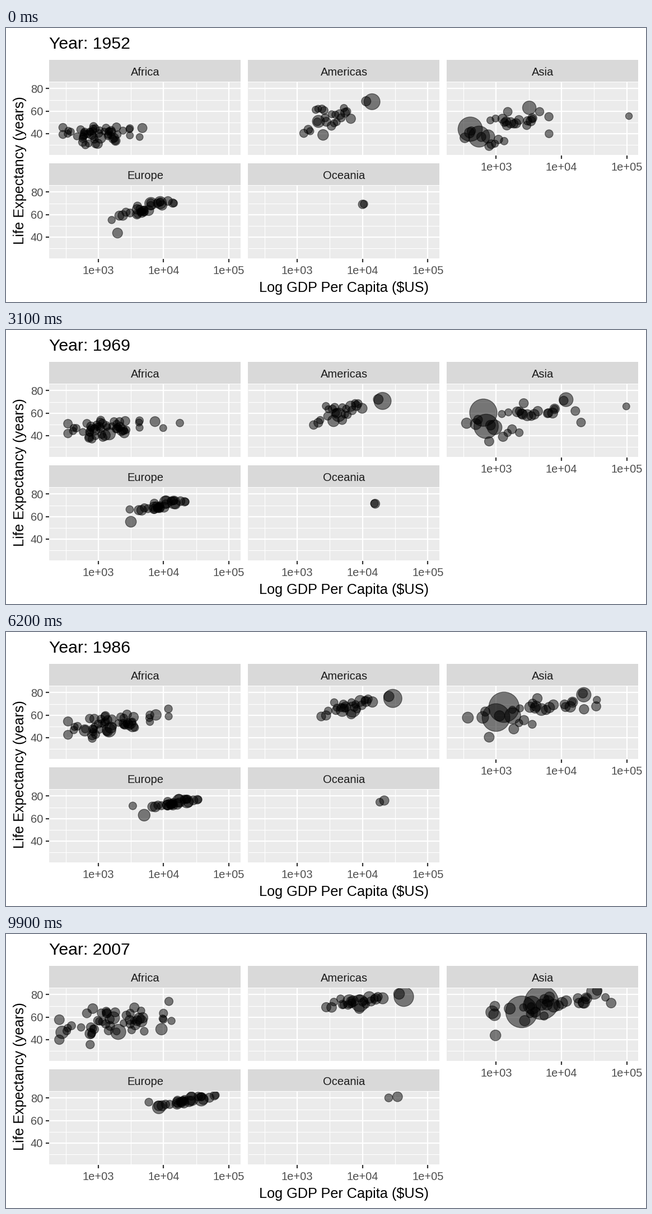
Recreate the animation shown at these times as a matplotlib script. Size 1143x490 px, loop 10000 ms.

```python
import numpy as np
import matplotlib.pyplot as plt
from matplotlib.animation import FuncAnimation
from matplotlib.patches import Rectangle

W, H, DPI = 1143, 490, 100
PT = 72 / DPI                      # points per pixel
FRAMES, INTERVAL = 100, 100
FIRST, LAST = 1952, 2007
PANEL_W, PANEL_H, STRIP_H = 342.6, 130.6, 39.6
X_MIN, X_SCALE = 2.2487, 116.53    # log10 income at left edge, px per decade
Y_MAX, Y_SCALE = 85.55, 2.0115     # life expectancy at top edge, px per year

plt.rcParams["font.family"] = "Liberation Sans"
rng = np.random.default_rng(12)

# Crowd shape at the start, middle and end of the loop:
# mean and spread of log10 income, mean and spread of life, their correlation
AFRICA = [(2.97, .27, 39.5, 4.8, .30),
          (3.15, .30, 50.5, 6.0, .55),
          (3.20, .42, 55.5, 9.5, .40)]
AMERICAS = [(3.48, .20, 53.3, 8.5, .60),
            (3.74, .21, 65.5, 5.8, .75),
            (3.90, .24, 73.5, 3.4, .55)]
ASIA = [(3.20, .32, 47.5, 8.5, .60),
        (3.60, .45, 63.0, 7.5, .70),
        (3.85, .48, 71.0, 6.0, .75)]
EUROPE = [(3.74, .22, 65.6, 4.2, .85),
          (4.12, .17, 72.7, 2.0, .75),
          (4.36, .23, 77.8, 2.6, .85)]

# Bubbles that stand out: population in millions at the start and the end,
# then (income, life) at evenly spaced times
AFRICA_BIG = [
    (1, 6, [(2388, 42.7), (20200, 51.8), (11000, 67.5), (12057, 74)]),
    (.4, 1.5, [(4293, 37), (10400, 47.4), (12200, 60.5), (13206, 56.7)]),
    (14, 44, [(4725, 45), (7600, 53), (7620, 61.2), (9270, 49.3)]),
    (33, 135, [(1077, 36.3), (1500, 42), (1450, 47.2), (2014, 46.9)]),
    (14, 65, [(781, 39.1), (890, 45.3), (590, 46.6), (278, 46.5)])]
AMERICAS_BIG = [
    (158, 301, [(13990, 68.4), (20800, 71), (30500, 75.4), (42952, 78.2)]),
    (15, 33, [(11367, 68.8), (17900, 72.5), (26550, 77.2), (36319, 80.7)]),
    (57, 190, [(2109, 50.9), (4500, 59), (7500, 65.8), (9066, 72.4)])]
ASIA_BIG = [
    (556, 1319, [(400, 44), (655, 61.5), (1450, 67.8), (4959, 73)]),
    (372, 1110, [(547, 37.4), (713, 49), (1040, 59.1), (2452, 64.7)]),
    (87, 127, [(3217, 63), (12800, 72.6), (23700, 78.9), (31656, 82.6)]),
    (82, 224, [(750, 37.5), (960, 48), (1950, 61), (3541, 70.7)]),
    (20, 48, [(331, 36.3), (354, 52), (370, 58.6), (944, 62.1)]),
    (8, 32, [(779, 28.8), (780, 35.3), (780, 41.1), (975, 43.8)]),
    (4, 28, [(6460, 39.9), (21500, 52.5), (22300, 67), (21655, 72.8)]),
    (.2, 2.5, [(108382, 55.6), (98000, 66.7), (30300, 74.5), (47307, 77.6)])]
EUROPE_BIG = [
    (22, 71, [(1969, 43.6), (3250, 56.2), (5350, 64), (8458, 71.8)]),
    (1.3, 3.6, [(1601, 55.2), (3150, 67.1), (3400, 71.9), (5937, 76.4)])]
OCEANIA_BIG = [
    (8.7, 20, [(10040, 69.1), (16100, 71.6), (22400, 76.7), (34435, 81.2)]),
    (2, 4.1, [(10557, 69.4), (15600, 71.8), (18800, 75), (25185, 80.2)])]


def radius(pop):
    return 5.75 + 24.64 * np.sqrt(pop / 1318.7)


def between(stops, t):
    """Value at t in 0..1 along evenly spaced stops."""
    stops = np.asarray(stops, float)
    pos = t * (len(stops) - 1)
    i = min(int(pos), len(stops) - 2)
    return stops[i] + (stops[i + 1] - stops[i]) * (pos - i)


class Crowd:
    """Random bubbles whose cloud follows the given shapes."""

    def __init__(self, count, shapes, pop, growth):
        self.shapes = shapes
        z = rng.normal(size=(4, count))
        z = (z - z.mean(1, keepdims=True)) / z.std(1, keepdims=True)
        self.u, self.v, self.w, size = np.clip(z, -1.9, 1.9)
        end = pop * np.exp(1.15 * size)
        self.radii = radius(end / growth), radius(end)

    def at(self, t):
        x, dx, y, dy, rho = between(self.shapes, t)
        drift = self.v * np.cos(t) + self.w * np.sin(t)
        life = y + dy * (rho * self.u + np.sqrt(1 - rho ** 2) * drift)
        return x + dx * self.u, life, between(self.radii, t)


class Landmark:
    """One bubble on its own path."""

    def __init__(self, start_pop, end_pop, path):
        self.path = [(np.log10(income), life) for income, life in path]
        self.radii = radius(start_pop), radius(end_pop)

    def at(self, t):
        return *between(self.path, t), between(self.radii, t)


fig = plt.figure(figsize=(W / DPI, H / DPI), dpi=DPI, facecolor="white")
ax = fig.add_axes([0, 0, 1, 1])
ax.set_xlim(0, W)
ax.set_ylim(H, 0)
ax.axis("off")


def text(x, y, s, size, color="black", ha="center", **kw):
    return ax.text(x, y, s, fontsize=size * PT, color=color, ha=ha,
                   va="baseline", **kw)


def line(xs, ys, color, width):
    ax.plot(xs, ys, color=color, lw=width * PT, solid_capstyle="butt",
            zorder=1)


def box(x, y, w, h, color):
    return ax.add_patch(Rectangle((int(x), int(y)), int(w), int(h),
                                  fc=color, lw=0))


class Panel:
    def __init__(self, name, col, row, landmarks, crowd=None):
        self.left = 77.4 + 355.25 * col
        self.top = 97.3 + 185 * row
        self.groups = [Landmark(*mark) for mark in landmarks]
        if crowd:
            self.groups.append(crowd)
        self.draw_back(name)
        self.dots = ax.scatter([], [], facecolor=(0, 0, 0, .5),
                               edgecolor=(0, 0, 0, .5), linewidth=1.3 * PT,
                               zorder=3)
        self.dots.set_clip_path(self.area)

    def x(self, log_income):
        return self.left + (log_income - X_MIN) * X_SCALE

    def y(self, life):
        return self.top + (Y_MAX - life) * Y_SCALE

    def draw_back(self, name):
        left, top = self.left, self.top
        right, bottom = left + int(PANEL_W), top + int(PANEL_H)
        self.area = box(left, top, PANEL_W, PANEL_H, "#EBEBEB")
        box(left, top - STRIP_H, PANEL_W, STRIP_H, "#D9D9D9")
        text((left + right) / 2, top - 12.6, name, 20.2, "#1A1A1A")
        for shift, width in ((.5, 1.1), (0, 2.2)):
            for k in range(3):
                y = self.y(40 + 20 * (k - shift))
                x = self.x(3 + k - shift)
                line([left, right], [y, y], "white", width)
                line([x, x], [top, bottom], "white", width)

    def x_axis(self):
        bottom = self.top + PANEL_H
        for v in (3, 4, 5):
            line([self.x(v)] * 2, [bottom, bottom + 6.3], "#333333", 2.2)
            text(self.x(v), bottom + 26.8, f"1e+0{v}", 20.2, "#4D4D4D")

    def y_axis(self):
        for v in (40, 60, 80):
            line([self.left - 6.3, self.left], [self.y(v)] * 2, "#333333", 2.2)
            text(self.left - 11.2, self.y(v) + 7.5, str(v), 20.2, "#4D4D4D",
                 ha="right")

    def update(self, t):
        parts = [np.atleast_2d(np.transpose(g.at(t))) for g in self.groups]
        log_income, life, r = np.vstack(parts).T
        self.dots.set_offsets(np.c_[self.x(log_income), self.y(life)])
        self.dots.set_sizes((2 * r * PT) ** 2)


africa = Panel("Africa", 0, 0, AFRICA_BIG, Crowd(47, AFRICA, 6.5, 3.6))
americas = Panel("Americas", 1, 0, AMERICAS_BIG, Crowd(22, AMERICAS, 9, 2.5))
asia = Panel("Asia", 2, 0, ASIA_BIG, Crowd(25, ASIA, 17, 2.7))
europe = Panel("Europe", 0, 1, EUROPE_BIG, Crowd(28, EUROPE, 9, 1.3))
oceania = Panel("Oceania", 1, 1, OCEANIA_BIG)
panels = [africa, americas, asia, europe, oceania]

for panel in (asia, europe, oceania):
    panel.x_axis()
for panel in (africa, europe):
    panel.y_axis()

title = text(77.4, 37, "", 30.3, ha="left")
text(604, 472.3, "Log GDP Per Capita ($US)", 25.2, parse_math=False)
text(32.5, 255, "Life Expectancy (years)", 25.2, rotation=90,
     rotation_mode="anchor")


def update(frame):
    t = frame / (FRAMES - 1)
    title.set_text(f"Year: {round(FIRST + t * (LAST - FIRST))}")
    for panel in panels:
        panel.update(t)
    return [title] + [p.dots for p in panels]


anim = FuncAnimation(fig, update, frames=FRAMES, interval=INTERVAL,
                     repeat=True, repeat_delay=0, blit=False)
plt.show()
```
